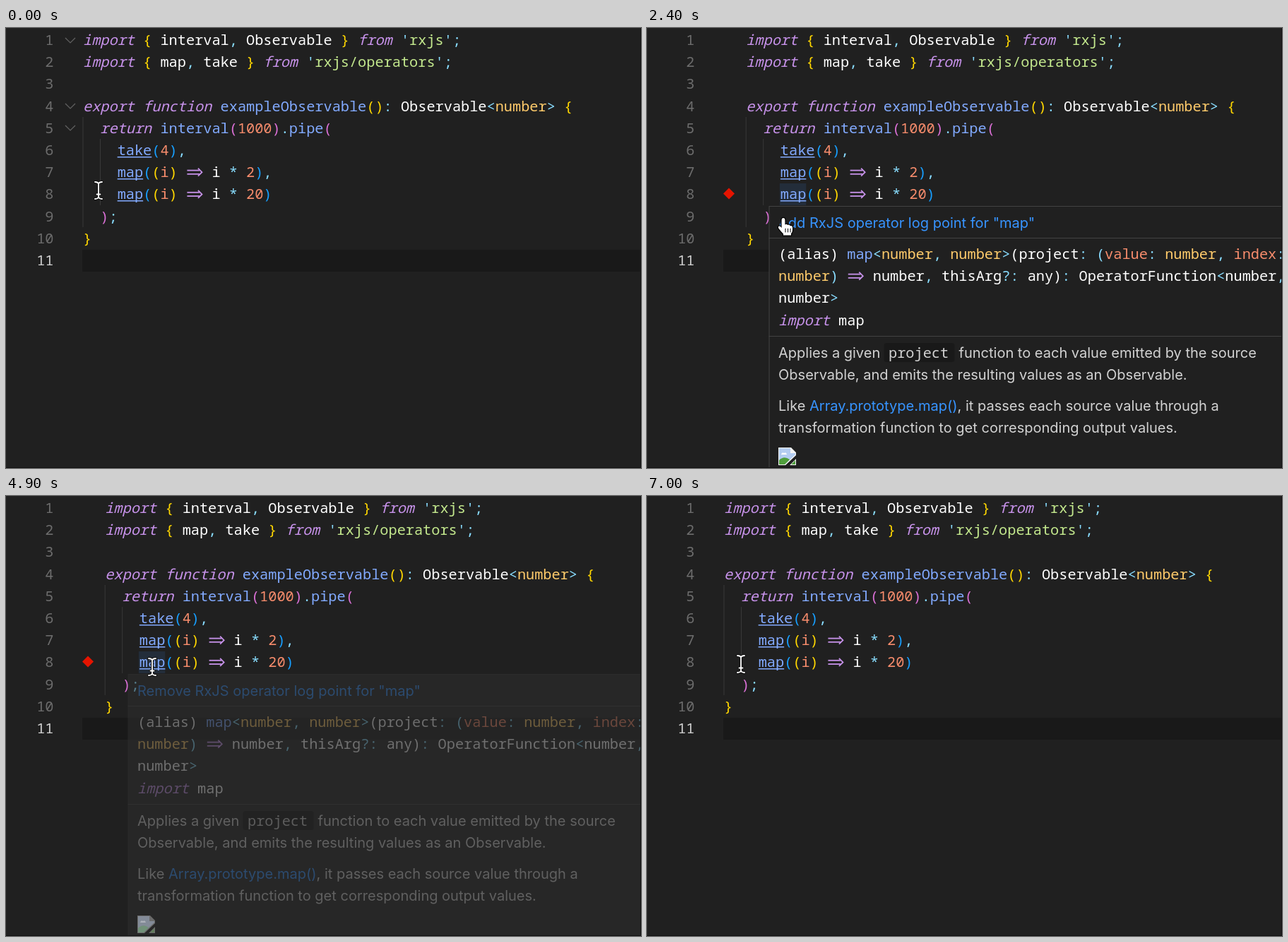
An HTML page with a canvas that plays this animation: 899x623 px, repeating every 8.3 s.

```html
<!DOCTYPE html>
<html lang="en">
<head>
<meta charset="utf-8">
<title>Operator log points</title>
<style>
  html, body { margin: 0; width: 100%; height: 100%; overflow: hidden; background: #202020; }
  canvas { display: block; }
</style>
</head>
<body>
<canvas id="stage" width="899" height="623"></canvas>
<script>
const ctx = document.getElementById('stage').getContext('2d');
const LOOP = 8300, STEP = 100;
const CHAR = 12.16, ROW = 31.2, BASE = 24;
const MONO = '500 20.27px "Noto Sans Mono", monospace';
const SANS = '20.02px Inter, sans-serif';
const BG = '#202020', LINK = '#3794ff', PROSE = '#d2d2d2';

// Each token starts with its colour key: k keyword, u underlined call, a arrow.
const COLORS = {
  k: '#c792ea', a: '#c792ea', y: '#ffd700', w: '#ffffff', c: '#89ddff', s: '#c3e88d',
  f: '#82aaff', u: '#82aaff', t: '#ffcb6b', p: '#da70d6', n: '#f78c6c', b: '#179fff'
};
const CODE = [
  "kimport ¦y{ ¦winterval¦c, ¦wObservable ¦y} ¦kfrom ¦c'¦srxjs¦c';",
  "kimport ¦y{ ¦wmap¦c, ¦wtake ¦y} ¦kfrom ¦c'¦srxjs/operators¦c';",
  "",
  "kexport function ¦fexampleObservable¦y()¦c: ¦wObservable¦c<¦tnumber¦c> ¦y{",
  "k  return ¦finterval¦p(¦n1000¦p)¦c.¦fpipe¦p(",
  "w    ¦utake¦b(¦n4¦b)¦c,",
  "w    ¦umap¦b(¦y(¦ni¦y) ¦a=>¦w i ¦c* ¦n2¦b)¦c,",
  "w    ¦umap¦b(¦y(¦ni¦y) ¦a=>¦w i ¦c* ¦n20¦b)",
  "p  )¦c;",
  "y}",
  ""
];
const SIGNATURE = [
  "w(alias) ¦fmap¦c<¦tnumber¦c, ¦tnumber¦c>¦w(project¦c: (¦nvalue¦c: ¦tnumber¦c, ¦nindex¦c:",
  "tnumber¦c) ¦a=>¦w number¦c, ¦wthisArg¦c?: ¦wany)¦c: ¦wOperatorFunction¦c<¦wnumber¦c,",
  "wnumber¦c>",
  "kimport ¦wmap"
];

// Pointer positions: [time, x, y]
const POINTER = [
  [0, 131, 230], [100, 137, 231], [300, 160, 234], [500, 176, 235], [1100, 176, 235],
  [1500, 183, 253], [1800, 192, 270], [1900, 193, 270], [2400, 193, 270], [2700, 160, 274],
  [3000, 144, 279], [3700, 144, 279], [4200, 166, 267], [4600, 205, 243], [4700, 207, 242],
  [4900, 207, 242], [5300, 205, 249], [5700, 222, 272], [6300, 222, 272], [6600, 206, 267],
  [7000, 133, 238], [LOOP, 133, 238]
];
const MARKED = [2100, 5900];
const CLICKS = [2000, 5800];
const HOVERS = [
  { from: 1050, to: 2700, action: 'Add' },
  { from: 4850, to: 6800, action: 'Remove' }
];

const HAND = new Path2D('M-2.4 2Q-2.4-1 0-1Q2.4-1 2.4 2V8.5Q5 6.8 6 9Q8.8 7.8 9.8 10.2Q13 9.5 13 13V16' +
  'Q13 19 11 21V23.5H0V21.5Q-3 18.5-6.5 14Q-8 11.5-6 10.6Q-4.5 10.2-2.4 13Z');
const BEAM = new Path2D('M-5-12Q-1-12 0-9.5Q1-12 5-12M0-9.5V9.5M-5 12Q-1 12 0 9.5Q1 12 5 12M-2.5 5.5H2.5');

const clamp01 = v => Math.max(0, Math.min(1, v));

function rect(color, x, y, w, h) {
  ctx.fillStyle = color;
  ctx.fillRect(x, y, w, h);
}

function text(str, x, y, color, font) {
  ctx.font = font;
  ctx.fillStyle = color;
  ctx.fillText(str, x, y);
  return x + ctx.measureText(str).width;
}

function strokeLine(color, width, ...points) {
  ctx.strokeStyle = color;
  ctx.lineWidth = width;
  ctx.beginPath();
  points.forEach(([x, y]) => ctx.lineTo(x, y));
  ctx.stroke();
}

function arrow(x, y, color) {
  strokeLine(color, 1.8, [x + 1.5, y - 2.6], [x + 19, y - 2.6]);
  strokeLine(color, 1.8, [x + 1.5, y + 2.6], [x + 19, y + 2.6]);
  strokeLine(color, 1.8, [x + 17, y - 5.5], [x + 22.5, y], [x + 17, y + 5.5]);
}

function codeLine(line, x, y) {
  for (const token of line ? line.split('¦') : []) {
    const key = token[0], str = token.slice(1), color = COLORS[key];
    const width = str.length * CHAR;
    if (key === 'a') arrow(x, y - 7, color);
    else text(str, x, y, color, (key === 'k' ? 'italic ' : '') + MONO);
    if (key === 'u') rect(color, x, Math.round(y) + 2, width, 1.5);
    x += width;
  }
}

function editor(shift, hovering, foldAlpha) {
  const left = 109 + shift;
  rect(BG, 0, 0, 899, 623);
  rect('#191919', 108, 314, 791, 31);
  rect('#383838', left - 0.5, 126, 1, 156);
  rect('#383838', left + 24, 157, 1, 94);
  if (hovering) rect('#232d3a', left + 4 * CHAR - 1, 220, 3 * CHAR + 1, 31);

  CODE.forEach((line, i) => {
    const y = BASE + i * ROW, label = String(i + 1);
    text(label, 67.5 - label.length * CHAR, y, i === 10 ? '#d0d0d0' : '#6c6c6c', MONO);
    codeLine(line, left, y);
  });

  ctx.globalAlpha = foldAlpha;
  for (const y of [17, 110, 141])
    strokeLine('#626262', 1.2, [84, y - 3], [91, y + 4], [98, y - 3]);
  ctx.globalAlpha = 1;

  if (shift) {
    ctx.fillStyle = '#e51400';
    ctx.fill(new Path2D('M116 226.5L124 234.5L116 242.5L108 234.5Z'));
  }
}

function brokenImage(x, y) {
  ctx.save();
  ctx.translate(x, y);
  ctx.fillStyle = '#f4f4f4';
  ctx.fill(new Path2D('M0 0H18L25 7V11L10 25H0ZM25 16V25H16Z'));
  ctx.fillStyle = '#b4cdf2';
  ctx.fill(new Path2D('M1 1H17V8H24V10L9 24H1Z'));
  ctx.fillStyle = '#ffffff';
  ctx.fill(new Path2D('M4 10Q5 6 8 8Q11 6 12 10Z'));
  ctx.fillStyle = '#4f9e3c';
  ctx.fill(new Path2D('M1 24V18Q8 11 16 17L9 24ZM18 24L24 18V24Z'));
  ctx.restore();
}

function popup(left, action, alpha) {
  const x = left + 13.5;
  ctx.globalAlpha = alpha;
  rect('#424242', left, 252, 899, 371);
  rect(BG, left + 1, 253, 899, 370);
  rect('#424242', left, 297, 899, 1);
  rect('#424242', left, 436, 899, 1);

  text(action + ' RxJS operator log point for "map"', x, 283, LINK, SANS);
  SIGNATURE.forEach((line, i) => codeLine(line, x, 327 + i * ROW));

  text('Applies a given', x, 467, PROSE, SANS);
  ctx.fillStyle = '#191919';
  ctx.beginPath();
  ctx.roundRect(left + 163, 446, 100, 27, 4);
  ctx.fill();
  text('project', left + 169.5, 467, PROSE, MONO);
  text('function to each value emitted by the source', left + 269, 467, PROSE, SANS);
  text('Observable, and emits the resulting values as an Observable.', x, 498, PROSE, SANS);

  let end = text('Like ', x, 542, PROSE, SANS);
  end = text('Array.prototype.map()', end, 542, LINK, SANS);
  text(', it passes each source value through a', end, 542, PROSE, SANS);
  text('transformation function to get corresponding output values.', x, 573, PROSE, SANS);
  brokenImage(x, 594);
  ctx.globalAlpha = 1;
}

function pointerAt(t) {
  const i = POINTER.findIndex(p => p[0] > t);
  const [t0, x0, y0] = POINTER[i - 1], [t1, x1, y1] = POINTER[i];
  const k = (t - t0) / (t1 - t0);
  return [x0 + (x1 - x0) * k, y0 + (y1 - y0) * k];
}

function ripple(age, x, y) {
  if (age < 0 || age >= 300) return;
  ctx.globalAlpha = 1 - age / 300;
  ctx.strokeStyle = '#2672c0';
  ctx.lineWidth = 1.5;
  ctx.beginPath();
  ctx.arc(x, y, 10 + age / 5, 0, 2 * Math.PI);
  ctx.stroke();
  ctx.globalAlpha = 1;
}

function pointer(x, y, isHand) {
  ctx.save();
  ctx.translate(x, y);
  ctx.lineJoin = ctx.lineCap = 'round';
  if (isHand) {
    ctx.strokeStyle = '#000000';
    ctx.lineWidth = 2.6;
    ctx.stroke(HAND);
    ctx.fillStyle = '#ffffff';
    ctx.fill(HAND);
    for (const finger of [3, 6.5, 10])
      strokeLine('#000000', 1, [finger, 14], [finger, 19]);
  } else {
    ctx.strokeStyle = '#111111';
    ctx.lineWidth = 4;
    ctx.stroke(BEAM);
    ctx.strokeStyle = '#ffffff';
    ctx.lineWidth = 1.8;
    ctx.stroke(BEAM);
  }
  ctx.restore();
}

function draw(t) {
  const shift = t >= MARKED[0] && t < MARKED[1] ? 31.2 : 0;
  const hover = HOVERS.find(h => t >= h.from && t < h.to);
  const foldAlpha = t < 600 ? clamp01(1 - t / 500) : 0;
  const [x, y] = pointerAt(t);

  editor(shift, hover, foldAlpha);
  if (hover) popup(shift ? 172.5 : 157, hover.action, clamp01((t - hover.from) / 150));
  CLICKS.forEach(start => ripple(t - start, x - 2, y - 2));
  pointer(x, y, hover && y > 262 && x > 170);
  rect('#111111', 898, 0, 1, 623);
  rect('#111111', 0, 622, 899, 1);
}

function tick() {
  draw(Math.floor(performance.now() % LOOP / STEP) * STEP);
  requestAnimationFrame(tick);
}
tick();
</script>
</body>
</html>
```
